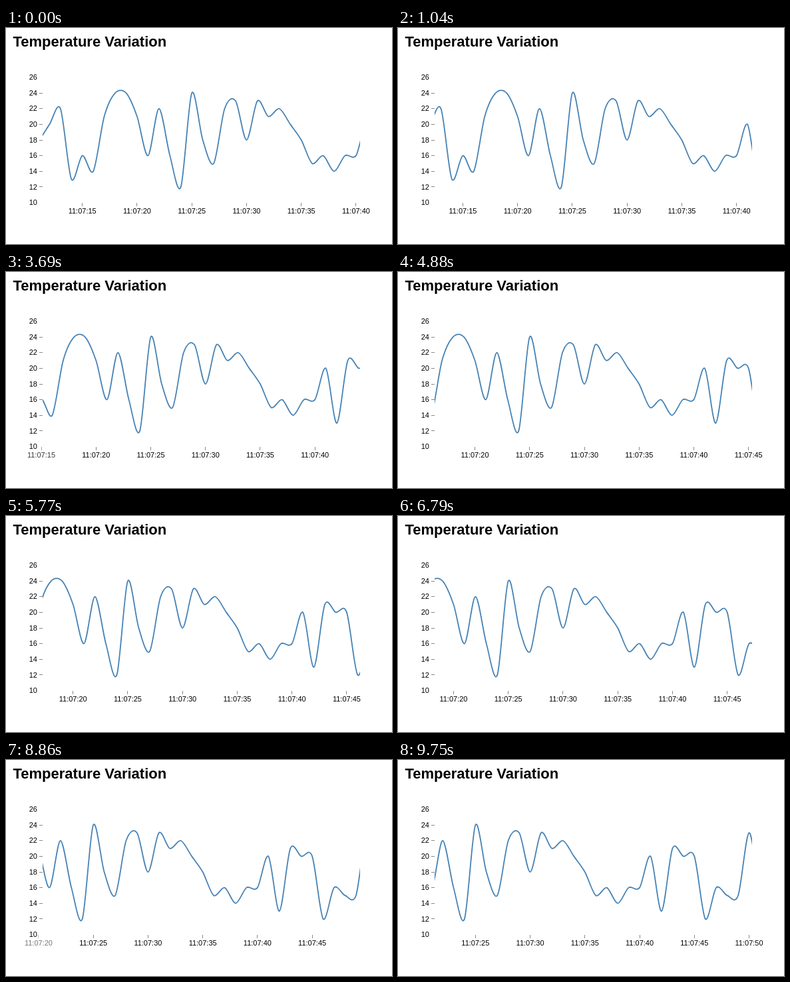
These frames come from a looping animation (580 by 326 pixels, 9.84 s). An HTML page:

```html
<!DOCTYPE html>
<html lang="en">
<head>
<meta charset="utf-8">
<title>Temperature Variation</title>
<style>
  html, body { margin: 0; width: 100%; height: 100%; overflow: hidden; background: #fff; }
  svg { display: block; width: 580px; height: 326px; }
  text { font: 11px "Liberation Sans", Arial, sans-serif; fill: #000; }
  .title { font-size: 22px; font-weight: bold; }
  .tick { stroke: #888; stroke-width: 1; shape-rendering: crispEdges; }
  .curve { fill: none; stroke: steelblue; stroke-width: 1.8; }
</style>
</head>
<body>
<svg viewBox="0 0 580 326">
  <clipPath id="plot"><rect x="55" y="70" width="477" height="194"/></clipPath>
  <text class="title" x="10.5" y="28">Temperature Variation</text>
  <g id="yAxis"></g>
  <g id="xAxis"></g>
  <g clip-path="url(#plot)"><path id="curve" class="curve"/></g>
</svg>
<script>
const LEFT = 55, RIGHT = 532, BOTTOM = 263.5;
const PER_SECOND = 477 / 29, PER_DEGREE = 189 / 16;
const FIRST = 10; // clock second of the first reading
const readings = [
  18, 18, 20, 22, 13, 16, 14, 21, 24, 24, 21, 16, 22, 16, 12, 24, 18, 15, 22, 23, 18, 23,
  21, 22, 20, 18, 15, 16, 14, 16, 16, 20, 13, 21, 20, 20, 12, 16, 15, 15, 23, 16, 18
];

// The chart advances in 150 ms steps of clock time; each run is [first, last, count].
const LOOP = 9840, STEP = 0.15;
const runs = [
  [150, 1190, 8], [1340, 2360, 8], [2510, 3540, 8], [3690, 4730, 8], [4880, 5910, 8],
  [6060, 7080, 8], [7230, 8260, 8], [8410, 9450, 8], [9600, 9750, 2]
];
const stamps = runs.flatMap(([from, to, n]) =>
  Array.from({ length: n }, (_, i) => Math.round((from + (to - from) * i / (n - 1)) / 10) * 10));

const xAt = second => 114.7 + (second - 15) * PER_SECOND;
const yAt = degree => BOTTOM - (degree - 10) * PER_DEGREE;
const clamp = v => Math.max(0, Math.min(1, v));
const byId = id => document.getElementById(id);

function add(parent, tag, attrs, text = "") {
  const node = document.createElementNS("http://www.w3.org/2000/svg", tag);
  for (const key in attrs) node.setAttribute(key, attrs[key]);
  node.textContent = text;
  return parent.appendChild(node);
}

// Cardinal spline with tension 0.7
function spline(points) {
  const at = i => points[Math.max(0, Math.min(points.length - 1, i))];
  const tangent = i => [0, 1].map(k => 0.15 * (at(i + 1)[k] - at(i - 1)[k]));
  const fmt = p => p.map(v => v.toFixed(2)).join(",");
  let d = "M" + fmt(points[0]);
  for (let i = 1; i < points.length; i++) {
    const a = tangent(i - 1), b = tangent(i);
    const c1 = points[i - 1].map((v, k) => v + a[k]);
    const c2 = points[i].map((v, k) => v - b[k]);
    d += "C" + [c1, c2, points[i]].map(fmt).join(" ");
  }
  return d;
}

for (let degree = 10; degree <= 26; degree += 2) {
  const y = yAt(degree);
  add(byId("yAxis"), "text", { x: 47, y: y + 3.7, "text-anchor": "end" }, degree);
  if (degree > 10 && degree < 26) {
    const row = Math.floor(y) + 0.5;
    add(byId("yAxis"), "line", { class: "tick", x1: 50, x2: 55, y1: row, y2: row });
  }
}

const marks = [15, 20, 25, 30, 35, 40, 45, 50].map(second => {
  const g = add(byId("xAxis"), "g", {});
  add(g, "line", { class: "tick", y1: 264, y2: 269 });
  add(g, "text", { y: 280, "text-anchor": "middle" }, "11:07:" + second);
  return { second, g };
});

const curve = byId("curve");
curve.setAttribute("d", spline(readings.map((v, i) => [xAt(FIRST + i), yAt(v)])));

function draw(time) {
  const step = stamps.filter(s => s <= time).length;
  const shift = -step * STEP * PER_SECOND;
  curve.setAttribute("transform", `translate(${shift},0)`);
  for (const { second, g } of marks) {
    const x = xAt(second) + shift;
    const entered = clamp(((RIGHT - x) / PER_SECOND + 0.05) / 0.33);
    const left = clamp(((x - LEFT) / PER_SECOND + 0.9));
    g.setAttribute("transform", `translate(${x},0)`);
    g.setAttribute("opacity", Math.min(entered, left));
  }
}

const start = performance.now();
function loop() {
  draw((performance.now() - start) % LOOP);
  requestAnimationFrame(loop);
}
loop();
</script>
</body>
</html>
```
